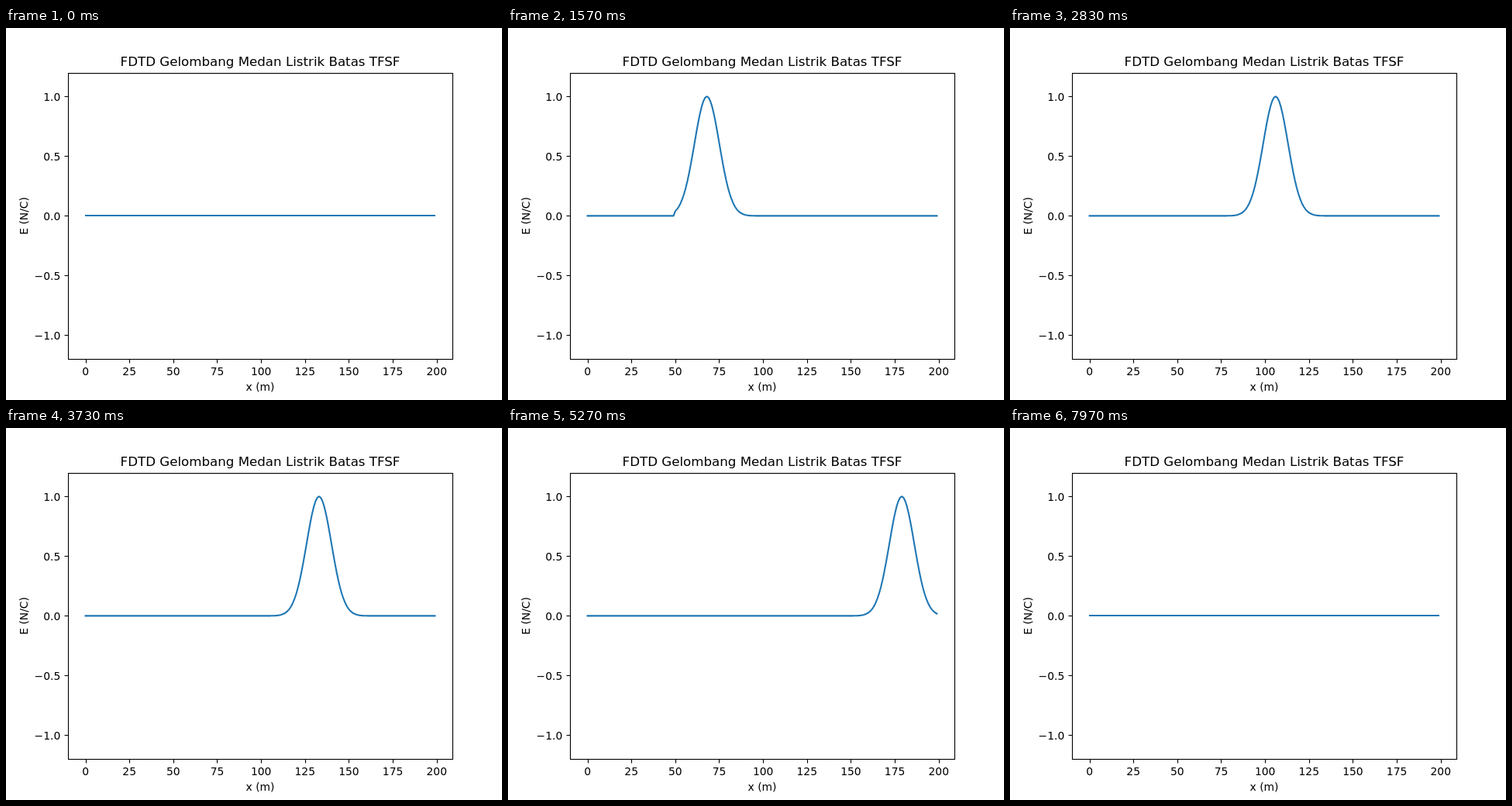
Recreate the animation shown at these times as an HTML page with a canvas. Size 640 px wide and 480 px high, loop 8 s.

```html
<!DOCTYPE html>
<html>
<head>
<meta charset="utf-8">
<style>
html, body { margin: 0; width: 100%; height: 100%; overflow: hidden; background: #fff; }
canvas { display: block; }
</style>
</head>
<body>
<canvas id="plot" width="640" height="480"></canvas>
<script>
const ctx = document.getElementById('plot').getContext('2d');
const LOOP = 8000, CELLS = 200, BOUNDARY = 50;
const left = 80, right = 576, upper = 58, lower = 427;
const toX = x => 102.545 + x * 450.909 / 199;
const toY = e => 242.4 - e * 154;
const font = size => size + 'px "DejaVu Sans", sans-serif';

function line(x1, y1, x2, y2) {
  ctx.beginPath();
  ctx.moveTo(x1, y1);
  ctx.lineTo(x2, y2);
  ctx.stroke();
}

function text(label, x, y, align = 'center') {
  ctx.textAlign = align;
  ctx.fillText(label, x, y);
}

function drawAxes() {
  ctx.strokeStyle = ctx.fillStyle = '#000';
  ctx.lineWidth = 1.11;
  ctx.lineCap = 'butt';
  ctx.lineJoin = 'miter';
  ctx.strokeRect(left + 0.5, upper + 0.5, right - left, lower - upper);

  ctx.font = font(13.889);
  for (let x = 0; x <= 200; x += 25) {
    const px = Math.round(toX(x)) + 0.5;
    line(px, lower + 0.5, px, lower + 5.5);
    text(x, toX(x), 448);
  }
  for (let e = -1; e <= 1; e += 0.5) {
    const py = Math.round(toY(e));
    line(left - 4.5, py + 0.5, left + 0.5, py + 0.5);
    text(e.toFixed(1).replace('-', '\u2212'), 70.3, py + 6, 'right');
  }
  text('x (m)', 328, 468);
  ctx.save();
  ctx.translate(28, 242.4);
  ctx.rotate(-Math.PI / 2);
  text('E (N/C)', 0, 0);
  ctx.restore();

  ctx.font = font(16.667);
  text('FDTD Gelombang Medan Listrik Batas TFSF', 328, 49);
}

// Gaussian pulse entering at the boundary cell and moving one cell per step
function drawWave(step) {
  ctx.strokeStyle = '#1f77b4';
  ctx.lineWidth = 2.083;
  ctx.lineCap = 'square';
  ctx.lineJoin = 'round';
  const flat = step < 3 || step >= 216;
  if (flat) return line(Math.round(toX(0)), 242, Math.round(toX(CELLS - 1)), 242);
  const peak = step + 21;
  ctx.beginPath();
  for (let x = 0; x < CELLS; x++) {
    const e = x < BOUNDARY ? 0 : Math.exp(-((x - peak) ** 2) / 100);
    ctx.lineTo(toX(x), toY(e));
  }
  ctx.stroke();
}

function draw() {
  const time = performance.now() % LOOP;
  // 30 steps per second, shown on a 10 ms clock
  const step = Math.floor((time + 3.5) * 0.03);
  ctx.fillStyle = '#fff';
  ctx.fillRect(0, 0, 640, 480);
  drawWave(step);
  drawAxes();
  requestAnimationFrame(draw);
}
draw();
</script>
</body>
</html>
```
